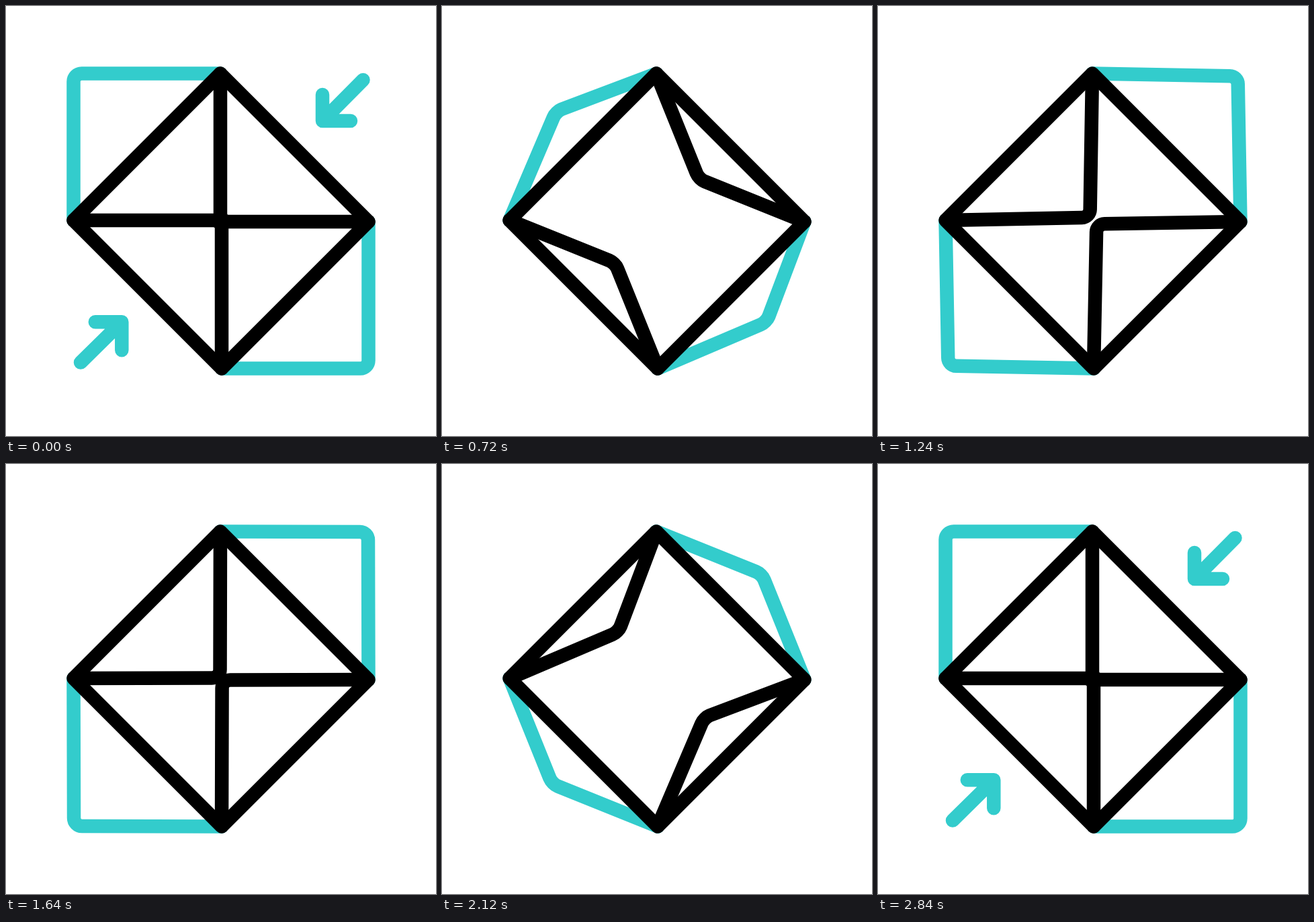
An HTML page with a canvas that plays this animation: 640 px wide and 640 px high, repeating every 3 s.

```html
<!DOCTYPE html>
<html lang="en">
<head>
<meta charset="utf-8">
<title>Folding corners</title>
<style>
  html, body { margin: 0; width: 100%; height: 100%; overflow: hidden; background: #fff; }
  canvas { display: block; width: 640px; height: 640px; }
</style>
</head>
<body>
<canvas id="stage" width="640" height="640"></canvas>
<script>
(() => {
  const ctx = document.getElementById('stage').getContext('2d');
  const TEAL = '#33cccc', BLACK = '#000';
  const LOOP = 3000, STEP = 40, FOLD = 1280, FIRST = 160, SECOND = 1560, ARROWS_OFF = 240;
  const RADIUS = 12.1, KAPPA = 0.5523, BOW = 21;

  const north = [319, 100.5], east = [539.5, 321], south = [321, 539.5], west = [100.5, 319];

  // from/to: shared edge ends; out/mid: unfolded and folded corner; bow: sideways drift
  const flaps = [
    { from: north, to: west, out: [100.5, 100.5], mid: [319, 319], bow: BOW, even: true },
    { from: east, to: south, out: [539.5, 539.5], mid: [321, 321], bow: BOW, even: true },
    { from: north, to: east, out: [539.5, 100.5], mid: [319, 321], bow: 0, even: false },
    { from: west, to: south, out: [100.5, 539.5], mid: [321, 319], bow: 0, even: false }
  ];

  const arrows = [
    { tip: [471, 171], dir: 1, tail: [60.5, -61], fly: [282, -293] },
    { tip: [172.3, 470.3], dir: -1, tail: [-61.3, 60.3], fly: [-292, 288] }
  ];

  const lerp = (a, b, k) => [a[0] + (b[0] - a[0]) * k, a[1] + (b[1] - a[1]) * k];

  // cubic-bezier(.75, 0, .25, 1)
  function ease(x) {
    if (x <= 0) return 0;
    if (x >= 1) return 1;
    let lo = 0, hi = 1;
    for (let i = 0; i < 30; i++) {
      const s = (lo + hi) / 2, r = 1 - s;
      if (2.25 * s * r * r + 0.75 * s * s * r + s * s * s < x) lo = s; else hi = s;
    }
    return lo * lo * (3 - 2 * lo);
  }

  // Point on the way from a corner to an edge end
  function toward(corner, end, dist) {
    return lerp(corner, end, dist / Math.hypot(end[0] - corner[0], end[1] - corner[1]));
  }

  function drawFlap(f, k) {
    const drift = f.bow * Math.min(k, 1 - k);
    const point = (end, dist) => {
      const p = lerp(toward(f.out, end, dist), toward(f.mid, end, dist), k);
      return [p[0] + drift, p[1] - drift];
    };
    const handle = RADIUS * (1 - KAPPA);
    ctx.strokeStyle = k < 0.5 ? TEAL : BLACK;
    ctx.beginPath();
    ctx.moveTo(...f.from);
    ctx.lineTo(...point(f.from, RADIUS));
    ctx.bezierCurveTo(...point(f.from, handle), ...point(f.to, handle), ...point(f.to, RADIUS));
    ctx.lineTo(...f.to);
    ctx.stroke();
  }

  function drawArrow(a, away) {
    const x = a.tip[0] + a.fly[0] * away, y = a.tip[1] + a.fly[1] * away;
    const [one, two] = a.dir > 0 ? [[0, -39], [42, 0]] : [[-39.5, 0], [0, 42]];
    ctx.strokeStyle = TEAL;
    ctx.beginPath();
    ctx.moveTo(x + one[0], y + one[1]);
    ctx.lineTo(x, y);
    ctx.lineTo(x + two[0], y + two[1]);
    ctx.moveTo(x, y);
    ctx.lineTo(x + a.tail[0], y + a.tail[1]);
    ctx.stroke();
  }

  function drawDiamond() {
    ctx.strokeStyle = BLACK;
    ctx.beginPath();
    [north, east, south, west].forEach(p => ctx.lineTo(...p));
    ctx.closePath();
    ctx.stroke();
  }

  function draw(t) {
    const back = ease((t - SECOND) / FOLD);
    const swing = t < SECOND ? ease((t - FIRST) / FOLD) : 1 - back;
    ctx.fillStyle = '#fff';
    ctx.fillRect(0, 0, 640, 640);
    ctx.lineWidth = 20.5;
    ctx.lineCap = ctx.lineJoin = 'round';
    flaps.forEach(f => drawFlap(f, f.even ? swing : 1 - swing));
    drawDiamond();
    if (t < ARROWS_OFF) arrows.forEach(a => drawArrow(a, 0));
    else if (t >= SECOND) arrows.forEach(a => drawArrow(a, 1 - back));
  }

  const start = performance.now();
  function tick() {
    const t = (performance.now() - start) % LOOP;
    draw(Math.floor(t / STEP) * STEP);
    requestAnimationFrame(tick);
  }
  tick();
})();
</script>
</body>
</html>
```
